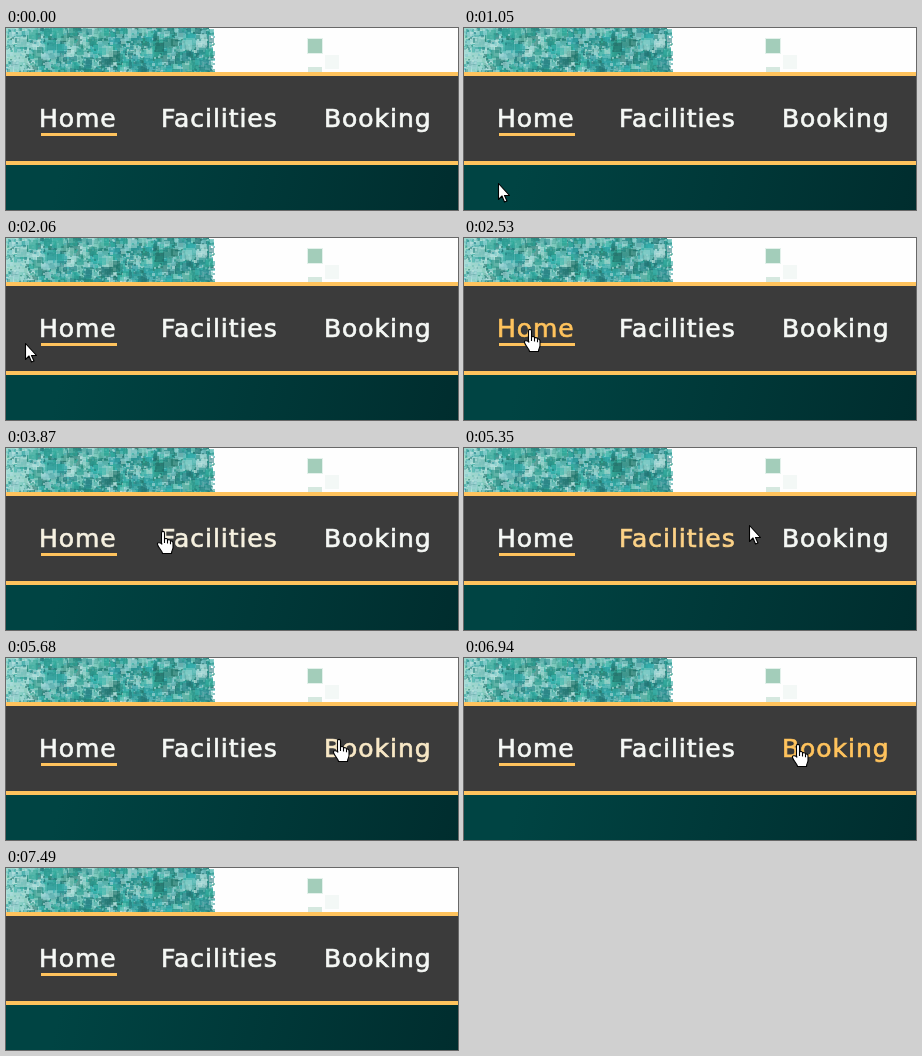
Animation of 452x182 px, one loop 8290 ms. Source, as an HTML page with a canvas:

```html
<!DOCTYPE html>
<html lang="en">
<head>
<meta charset="utf-8">
<title>Navigation hover</title>
<style>
  html, body { margin: 0; width: 100%; height: 100%; overflow: hidden; background: #fefefe; }
  canvas, svg { position: absolute; left: 0; top: 0; display: block; }
  text { font: 25px "DejaVu Sans", sans-serif; letter-spacing: .95px; stroke-width: .7px; }
  #cursor path { fill: #fff; stroke: #000; stroke-width: 1.1; stroke-linejoin: round; }
</style>
</head>
<body>
<canvas id="mosaic" width="452" height="44"></canvas>
<svg width="452" height="182" viewBox="0 0 452 182">
  <defs>
    <linearGradient id="teal" gradientUnits="userSpaceOnUse" x1="60" y1="110" x2="450" y2="200">
      <stop offset="0" stop-color="#004443"/>
      <stop offset="1" stop-color="#002d2e"/>
    </linearGradient>
  </defs>
  <rect y="137" width="452" height="45" fill="url(#teal)"/>
  <rect y="44" width="452" height="93" fill="#ffc35d"/>
  <rect y="48" width="452" height="85" fill="#3b3b3b"/>
  <text x="33" y="99">Home</text>
  <text x="155" y="99">Facilities</text>
  <text x="318" y="99">Booking</text>
  <rect x="35" y="105" width="76" height="3" fill="#ffc35d"/>
  <g id="cursor">
    <path id="arrow" d="M.5 .5V16.5L4 13l2.5 6 2.5-1-2.5-5.5h5z"/>
    <g id="hand">
      <path d="M-1.5 13V2C-1.5-.2 1.5-.2 1.5 2V8c1-1 3-.5 3 1 1-.8 3-.3 3 1.2 1-.6 2.5 0 2.5 1.8v4.5c0 2-1.5 3-1.5 6h-9c0-2.5-4-5.5-5-9-.5-2 2-2.5 4.5-.5z"/>
      <path d="M1.5 8v4M4.5 9v3.5M7.5 10.2v3" fill="none"/>
    </g>
  </g>
</svg>
<script>
const LOOP = 8290, STEP = 67, PHASE = .37, FADE = 300;
const WHITE = "#f5f8f5", GOLD = "#ffc35d";
const byId = id => document.getElementById(id);
const clamp = v => Math.max(0, Math.min(1, v));
const smooth = p => p * p * (3 - 2 * p);
const fadeOut = p => 1 - (1 - clamp(p)) ** 2;

// Each move bends from the previous stop towards `bend` and ends at `to`
const entry = [298, 183];
const moves = [
  { start: 500, end: 1120, bend: [130, 166], to: [28, 154] },
  { start: 1560, end: 2530, bend: [-11, 90], to: [66, 91] },
  { start: 3400, end: 4210, bend: [166, 77], to: [179, 88] },
  { start: 4880, end: 5940, bend: [345, 66], to: [334, 86] },
  { start: 6880, end: 7490, bend: [334, 130], to: [330, 192] }
];

// Links in order, with the time the pointer enters and leaves each
const hovers = [[2220, 3680], [3850, 5300], [5630, 7060]];
const links = [...document.querySelectorAll("text")];

function pointerAt(t) {
  let from = entry;
  for (const { start, end, bend, to } of moves) {
    if (t < start) break;
    const p = smooth(clamp((t - start) / (end - start))), q = 1 - p;
    from = from.map((a, i) => q * q * a + 2 * q * p * bend[i] + p * p * to[i]);
  }
  return from.map(Math.round);
}

function drawMosaic() {
  const ctx = byId("mosaic").getContext("2d");
  let seed = 7;
  const random = () => (seed = seed * 16807 % 2147483647) / 2147483647;
  const square = (color, x, y, size) => {
    ctx.fillStyle = color;
    ctx.fillRect(x, y, size, size);
  };

  // Pale green on the left, deeper teal towards the ragged right edge
  const base = ctx.createLinearGradient(0, 0, 205, 0);
  base.addColorStop(0, "#a5dccd");
  base.addColorStop(.3, "#5fb3ac");
  base.addColorStop(1, "#419a98");
  ctx.fillStyle = base;
  ctx.fillRect(0, 0, 203, 44);
  for (let i = 0; i < 2200; i++) {
    const size = 2 + Math.floor(random() ** 4 * 10);
    const x = Math.floor(random() * (210 - size));
    const y = Math.floor(random() * 48) - 2;
    const light = random() < .3 + .4 * Math.exp(-x / 35);
    const hue = 168 + random() * 16;
    const lightness = light ? 60 + random() * 25 : 27 + random() * 20;
    square(`hsla(${hue}, ${light ? 42 : 55}%, ${lightness}%, .55)`, x, y, size);
  }
  square("#e3f1eb", 301, 10, 16);
  square("#a3cdba", 302, 11, 14);
  square("#d5e8df", 302, 39, 14);
  square("#f3f8f6", 319, 27, 14);
}

function render(time) {
  const t = (Math.floor(time / STEP + PHASE) - PHASE) * STEP + 10;
  byId("cursor").setAttribute("transform", `translate(${pointerAt(t)})`);

  const onLink = hovers.some(([enter, leave]) => t >= enter && t < leave);
  byId("hand").style.display = onLink ? "" : "none";
  byId("arrow").style.display = onLink ? "none" : "";

  links.forEach((link, i) => {
    const [enter, leave] = hovers[i];
    const glow = fadeOut((t - enter) / FADE) - fadeOut((t - leave) / FADE);
    const color = `color-mix(in srgb, ${GOLD} ${(glow * 100).toFixed(1)}%, ${WHITE})`;
    link.style.fill = link.style.stroke = color;
  });
}

drawMosaic();
const start = performance.now();
function tick() {
  render((performance.now() - start) % LOOP);
  requestAnimationFrame(tick);
}
tick();
</script>
</body>
</html>
```
